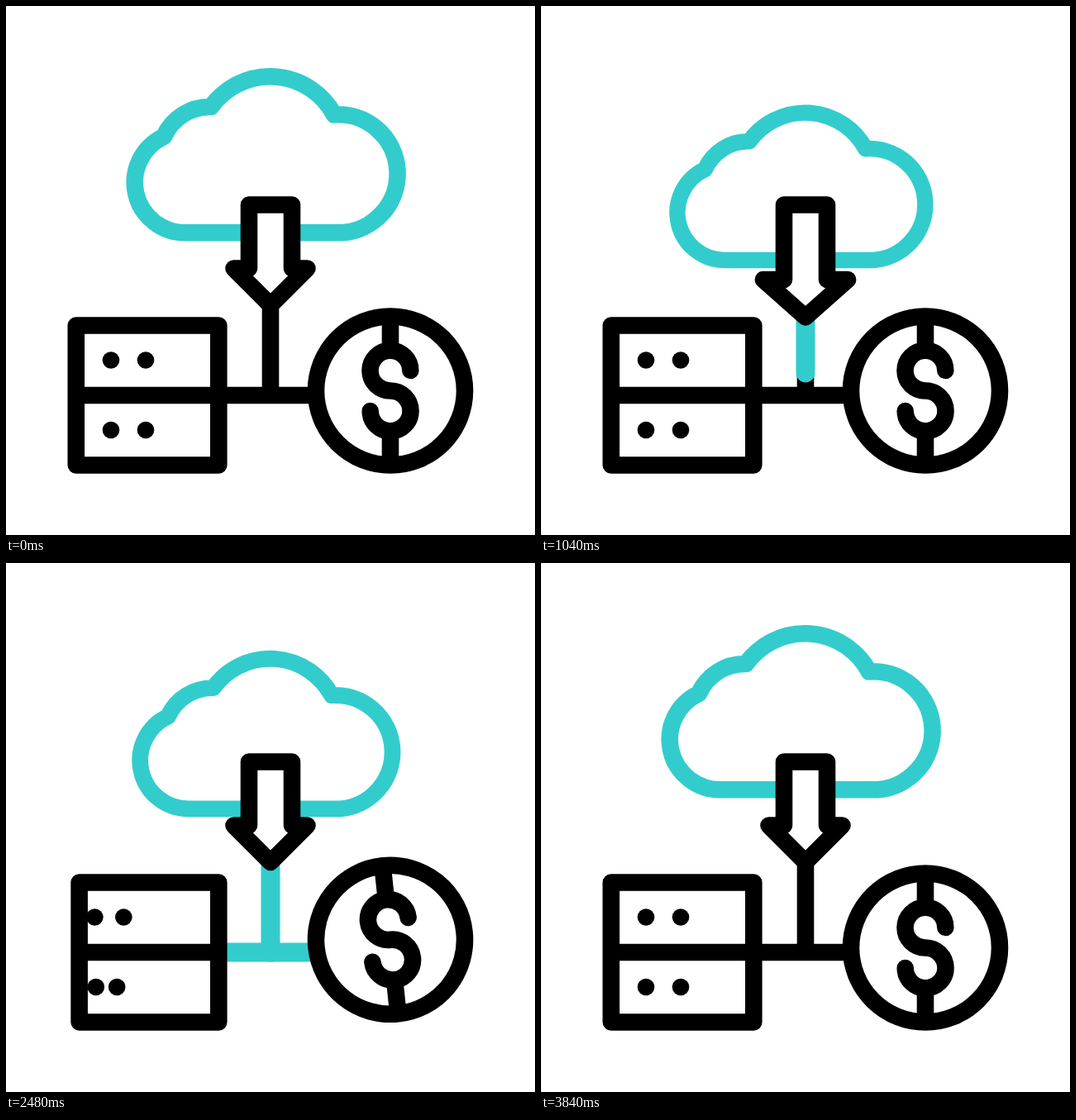
Write an HTML page that moves like this. It is 640 px wide and 640 px high and loops after 4000 ms.

```html
<!DOCTYPE html>
<html lang="en">
<head>
<meta charset="utf-8">
<title>Cloud download</title>
<style>
  html, body { margin: 0; width: 100%; height: 100%; overflow: hidden; background: #fff; }
  svg { display: block; width: 100vw; height: 100vh; }
  .ink, .sky { stroke-linejoin: round; fill: none; }
  .ink { stroke: #000; stroke-width: 20.6; }
  .sky { stroke: #33cccc; stroke-width: 20.6; }
  .flow { stroke-width: 23; stroke-linecap: round; }
  .solid { fill: #fff; }
  .round { stroke-linecap: round; }
</style>
</head>
<body>
<svg viewBox="0 0 640 640">
  <path id="cloud" class="sky" d="M217.5 274.3A61 61 0 0 1 191 158A61 61 0 0 1 248 122
    A88 88 0 0 1 397 131.5A71.5 71.5 0 1 1 407 274.3Z"/>
  <path class="ink" d="M320 340V471M257 471H375"/>
  <path id="stem" class="sky flow"/>
  <path id="branch" class="sky flow"/>
  <path id="arrow" class="ink solid"/>
  <path id="server" class="ink solid"/>
  <g id="dots">
    <circle cy="428.5" r="10.3"/>
    <circle cy="428.5" r="10.3"/>
    <circle cy="513" r="10.3"/>
    <circle cy="513" r="10.3"/>
  </g>
  <g id="coin">
    <circle class="ink solid" cx="465" cy="465.5" r="90"/>
    <path class="ink" d="M465 375V417M465 514V556"/>
    <path class="ink round" d="M489.3 441A24.4 24.4 0 1 0 465 465.5A24.4 24.4 0 1 1 440.7 490"/>
  </g>
</svg>
<script>
const LOOP = 4000, STEP = 80;
const el = id => document.getElementById(id);
const draw = (id, d) => el(id).setAttribute('d', d);

// Value at time t on a list of [time, value] keys, with sine easing between them.
function track(keys, t) {
  let i = keys.findIndex(k => k[0] > t);
  if (i === 0) return keys[0][1];
  if (i < 0) return keys[keys.length - 1][1];
  const [t0, a] = keys[i - 1], [t1, b] = keys[i];
  return a + (b - a) * (1 - Math.cos(Math.PI * (t - t0) / (t1 - t0))) / 2;
}

const cloudKeys = [[190, 0], [1400, 1], [3720, 0]];
const arrowKeys = [[200, 0], [1360, 1], [2520, 0]];
const stemKeys = [[200, 0], [1360, 1], [3430, 1], [3840, 0]];
const branchKeys = [[1360, 0], [2480, 1], [2808, 1], [3440, 0]];
const wallKeys = [[1860, 0], [2280, -10], [2600, 10], [2700, 10], [3520, 0]];
const coinKeys = [[1860, 0], [2140, 13], [2540, -11], [2920, 9], [3440, 0]];

const slosh = (left, turn, right) => [[1860, 0], [2300, left], [turn, right], [3520, 0]];
const dotKeys = [
  [127, slosh(-36, 2860, 34)],
  [169, slosh(-40, 2860, 17)],
  [127, slosh(-29, 3000, 41)],
  [169, slosh(-45, 3000, 21)]
];

function render(t) {
  const c = track(cloudKeys, t);
  el('cloud').setAttribute('transform',
    `translate(${22.7 * c} ${61.1 * c}) scale(${1 - 0.071 * c})`);

  const a = track(arrowKeys, t);
  const wing = 317.5 + 16.5 * a, half = 44.5 + 8 * a;
  draw('arrow', `M294 240.5H346V${wing}H${320 + half}L320 ${362 + 17.5 * a}L${320 - half} ${wing}H294Z`);

  draw('stem', `M320 317V${317 + 154 * track(stemKeys, t)}`);
  const b = track(branchKeys, t);
  draw('branch', b > 0 ? `M${320 - 72 * b} 471H${320 + 58 * b}` : '');

  const x = 84.8 + track(wallKeys, t);
  draw('server', `M${x} 386.5H257.3V555.5H${x}ZM${x} 471H257.3`);
  dotKeys.forEach(([home, keys], i) =>
    el('dots').children[i].setAttribute('cx', home + track(keys, t)));

  const y = track(coinKeys, t);
  el('coin').setAttribute('transform', `translate(0 ${y}) rotate(${0.62 * y} 465 465.5)`);
}

function tick() {
  render(Math.floor(performance.now() % LOOP / STEP) * STEP);
  requestAnimationFrame(tick);
}
tick();
</script>
</body>
</html>
```
